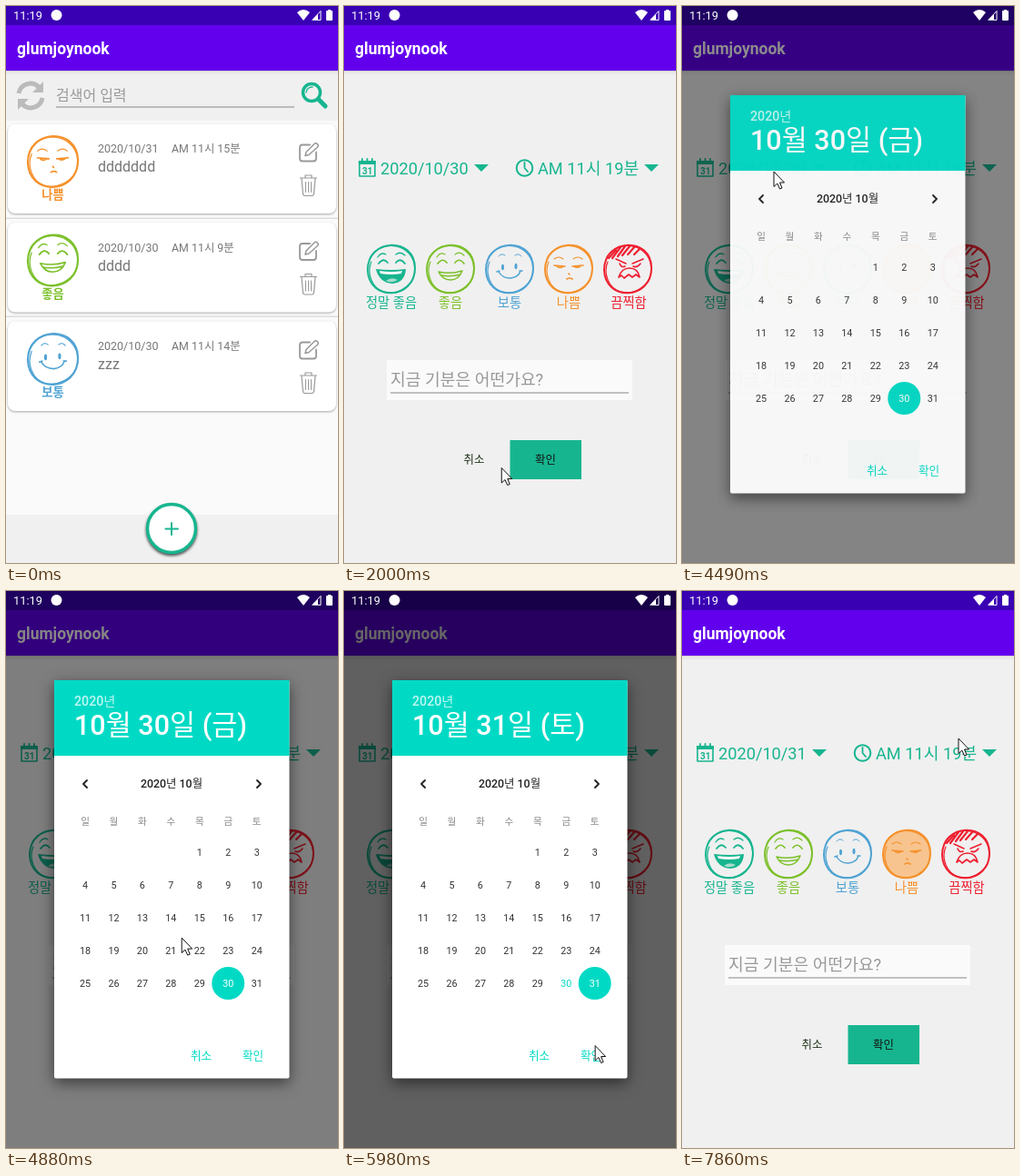
These frames come from a looping animation (365 px wide and 612 px high, 8 s). An HTML page:

```html
<!DOCTYPE html>
<html lang="ko">
<head>
<meta charset="utf-8">
<style>
html, body { margin: 0; width: 100%; height: 100%; overflow: hidden; background: #fafafa; }
svg { display: block; width: 365px; height: 612px; font-family: Roboto, "Noto Sans CJK KR", "Noto Sans CJK JP", sans-serif; }
.line { fill: none; stroke-linecap: round; stroke-linejoin: round; }
.card { filter: drop-shadow(0 1px 1px #0005); }
.dialog { filter: drop-shadow(0 5px 8px #0008); }
</style>
</head>
<body>
<svg id="stage" viewBox="0 0 365 612"></svg>
<script>
const LOOP = 8000;
const TEAL = '#17b58f', ACCENT = '#00dac5';

const text = (x, y, size, fill, str, extra = '') =>
  `<text x="${x}" y="${y}" font-size="${size}" fill="${fill}" ${extra}>${str}</text>`;
const mid = (x, y, size, fill, str, extra = '') =>
  text(x, y, size, fill, str, `text-anchor="middle" ${extra}`);
const rect = (x, y, w, h, fill, extra = '') =>
  `<rect x="${x}" y="${y}" width="${w}" height="${h}" fill="${fill}" ${extra}/>`;
const line = (d, color, width, extra = '') =>
  `<path class="line" d="${d}" stroke="${color}" stroke-width="${width}" ${extra}/>`;
const shape = (d, fill) => `<path d="${d}" fill="${fill}"/>`;
const at = (x, y, body, scale = 1) =>
  `<g transform="translate(${x} ${y}) scale(${scale})">${body}</g>`;

// Faces, drawn around their own centre
const brows = 'M-15-13Q-11-19-6-16M5-16Q10-20 15-15';
const smileEyes = 'M-14-6Q-9-13-4-7M5-7Q10-13 15-6';
const moods = {
  great: { color: TEAL, label: '정말 좋음', draw: c =>
    line(brows, c, 1.3) + line(smileEyes, c, 1.8) +
    shape('M-17 0Q0 2 16 0Q15 15 1 16Q-13 15-17 0Z', c) +
    shape('M-13 2Q0 4 12 2L11 5Q0 7-12 5Z', '#f8f8f8') +
    shape('M-6 13Q0 8 7 12Q1 16-6 13Z', '#a9dccd') },
  good: { color: '#7cc02b', label: '좋음', draw: c =>
    line(brows, c, 1.2) + line(smileEyes, c, 1.7) +
    line('M-13 3Q0 6 13 2Q9 12 0 12Q-9 12-13 3ZM-10 7Q0 9 11 6', c, 1.5) },
  normal: { color: '#4fa3d3', label: '보통', draw: c =>
    line('M-12-14Q-9-18-5-15M6-15Q10-18 13-14', c, 1) +
    `<g fill="${c}"><ellipse cx="-7.500" cy="-2" rx="1.500" ry="3.200"/><ellipse cx="7" cy="-3" rx="1.500" ry="3.200"/></g>` +
    line('M-12 3Q-8 10 1 10Q10 9 12 2M-14 3L-11 2M11 2L14 2', c, 1.5) },
  bad: { color: '#f5912c', label: '나쁨', draw: c =>
    line('M-16-11Q-11-15-6-11M5-11Q10-15 15-11', c, 1.1) +
    line('M-16-4L-4-3M4-3L16-4M-13-3Q-10 0-6-3M6-3Q10 0 14-4M-2 11Q1 9 4 11M0 5L1 6', c, 1.6) },
  awful: { color: '#ee2030', label: '끔찍함', draw: c =>
    line('M-21-12L-13-21M-17-12L-8-24M-11-14L-3-25M-6-15L2-25M0-16L8-25M7-16L13-22', c, 2.2) +
    line('M-13-11L-2-6M17-11L5-6M-9-6Q-7-1-3-3M14-6Q10-1 6-3', c, 1.6) +
    line('M-10 9Q-7-1 2-1Q11-1 13 9L9 6L5 9L1 6L-4 10L-7 7Z', c, 1.7) }
};
const face = ({ color, draw }) =>
  line('M-26 1C-26-34 26-36 26-1C26 34-25 36-26 1Z', color, 2) +
  line('M-23-13C-13-31 18-30 25-7C30 16 9 29-8 25C-22 21-27 4-22-8', color, 1.2) + draw(color);

const caret = (x, y) => shape(`M${x} ${y}h16l-8 8Z`, TEAL);

// Shared top of every screen
const toolbar = rect(0, 71, 365, 1, '#0002') + rect(0, 72, 365, 3, '#00000009') +
  rect(0, 0, 365, 21, '#3900b3') + rect(0, 21, 365, 50, '#6200ee') +
  text(12, 53, 17.5, '#fff', 'glumjoynook', 'font-weight="600"');

const statusIcons = text(8, 15, 12.8, '#fff', '11:19') +
  '<circle cx="55.500" cy="10" r="6" fill="#fff"/>' +
  shape('M320 7Q327 1 334 7L327 16Z', '#fff') +
  line('M337 15L346 5.500V15Z', '#fff', 1) + shape('M337 15L343 9V15Z', '#fff') +
  rect(352, 5, 7, 11, '#fff', 'rx="1"') + rect(354, 4, 3, 2, '#fff');

const pencil = line('M12 3H4Q1 3 1 6V18Q1 21 4 21H16Q19 21 19 18V11', '#999', 1.8) +
  line('M7 15L8 11L17 2Q19 0 21 3Q22 4 20 6L11 14Z', '#999', 1.5);
const trash = line('M1 4.500H19M6.500 4V1.500H13.500V4M2.500 5L4 22Q4.500 24 6 24H14Q15.500 24 16 22L17.500 5', '#999', 1.2) +
  line('M7 9V20M10 9V20M13 9V20', '#999', 1);

function card(y, mood, date, time, note) {
  return rect(2, y, 361, 98.5, '#fff', 'rx="8" class="card"') +
    at(51.5, y + 41.5, face(mood), 1.06) +
    mid(51.5, y + 82.5, 13.3, mood.color, mood.label, 'font-weight="700"') +
    text(101, y + 31.5, 12.5, '#777', date) + text(182, y + 31.5, 12.4, '#777', time) +
    text(101, y + 52.5, 16, '#777', note) +
    at(322, y + 20, pencil) + at(322.5, y + 55, trash);
}

const list = rect(0, 0, 365, 612, '#fafafa') + rect(0, 71, 365, 55, '#f0f0f0') +
  line('M14 96A13 13 0 0 1 36 89M40 101A13 13 0 0 1 18 108', '#bbb', 5, 'style="stroke-linecap:butt"') +
  shape('M41 83V95H29ZM13 114V102H25Z', '#bbb') +
  text(55, 104, 16, '#999', '검색어 입력') + rect(55, 110.5, 262, 1, '#888') +
  `<circle cx="336" cy="95" r="9.500" fill="none" stroke="${TEAL}" stroke-width="3.500"/>` +
  line('M344 103L351 110', TEAL, 5) + line('M330 95Q331 89 337 89', TEAL, 1.3) +
  rect(0, 232.5, 365, 1.5, '#ddd') + rect(0, 340.5, 365, 1.5, '#ddd') +
  card(129.5, moods.bad, '2020/10/31', 'AM 11시 15분', 'ddddddd') +
  card(238, moods.good, '2020/10/30', 'AM 11시 9분', 'dddd') +
  card(346.5, moods.normal, '2020/10/30', 'AM 11시 14분', 'zzz') +
  rect(0, 559, 365, 53, '#f0f0f0') +
  `<circle cx="182" cy="574" r="26.500" fill="#fff" stroke="${TEAL}" stroke-width="3.500" style="filter:drop-shadow(0 2px 1.5px #000a)"/>` +
  line('M175.500 574.500H189M182 568V581', TEAL, 2) + toolbar;

const editor = rect(0, 0, 365, 612, '#f0f0f0') +
  line('M17 171H34V187H17Z', TEAL, 1.6) + rect(16, 170, 19, 4, TEAL) +
  line('M20 168V171M25.500 168V171M31 168V171', TEAL, 1.8) +
  mid(25.7, 185, 10, TEAL, '31', 'font-weight="700"') +
  text(40, 185, 18.2, TEAL, '', 'id="date"') + caret(143, 174) +
  `<circle cx="198.500" cy="178" r="8.800" fill="none" stroke="${TEAL}" stroke-width="2"/>` +
  line('M198.500 172V178L202 182', TEAL, 1.8) +
  text(213, 185, 18.2, TEAL, 'AM 11시 19분') + caret(330, 174) +
  '<ellipse id="tint" cx="247" cy="289" rx="26" ry="26" fill="#f7c48f"/>' +
  ['great', 'good', 'normal', 'bad', 'awful'].map((name, i) => {
    const x = 52 + 65 * i, mood = moods[name];
    return at(x, 289, face(mood)) + mid(x + (i === 4 ? 1 : 0), 330.5, 14.3, mood.color, mood.label);
  }).join('') +
  rect(47, 389, 270, 44, '#fafafa') + text(51, 416.5, 18.2, '#999', '지금 기분은 어떤가요?') +
  rect(51, 424.5, 262, 1, '#888') +
  mid(143, 502.5, 12.4, '#1c3014', '취소') + rect(182.5, 477, 78.5, 43, TEAL) +
  mid(221.5, 502.5, 12.4, '#111', '확인') + toolbar;

const dayX = col => 87 + 31.45 * col;
const days = Array.from({ length: 31 }, (_, i) => {
  const cell = i + 4;
  return mid(dayX(cell % 7), 291 + 35.9 * Math.floor(cell / 7), 10.8, '#333', i + 1, `id="day${i + 1}"`);
}).join('');

const dialog = rect(53, 98, 258.5, 437.5, '#fff', 'rx="2" class="dialog"') +
  rect(53, 98, 258.5, 83, ACCENT) +
  text(75, 126, 14.2, '#ffffffc0', '2020년', 'font-weight="500"') +
  text(75, 158, 30.5, '#fff', '', 'id="heading" font-weight="500"') +
  line('M89 208L85 212L89 216M276 208L280 212L276 216', '#222', 1.8) +
  mid(182, 216, 12.4, '#222', '2020년 10월', 'font-weight="500"') +
  [...'일월화수목금토'].map((d, i) => mid(dayX(i), 257, 10.6, '#888', d)).join('') +
  `<circle id="selected" cy="431" r="18" fill="${ACCENT}"/>` + days +
  mid(214.5, 514.5, 12.6, ACCENT, '취소', 'font-weight="500"') +
  mid(271.5, 514.5, 12.6, ACCENT, '확인', 'font-weight="500"') +
  rect(53, 98, 258.5, 437.5, '#000', 'id="shade" rx="2"');

document.getElementById('stage').innerHTML = list +
  `<g id="editor">${editor}</g>` + rect(0, 0, 365, 612, '#000', 'id="dim"') + statusIcons +
  `<g id="dialog">${dialog}</g>` +
  `<g id="pointer"><circle id="press" r="12.500" fill="#ffee00"/>
   <path d="M0 0V16.500L3.800 13L6.500 19L9 18L6.500 12H11.500Z" fill="#fff" stroke="#111" stroke-width="1"/></g>`;

const $ = id => document.getElementById(id);
const set = (id, name, value) => $(id).setAttribute(name, value);
const ramp = (t, from, to) => {
  const p = Math.min(1, Math.max(0, (t - from) / (to - from)));
  return p * p * (3 - 2 * p);
};

// Pointer keys: time, x, y
const pointerKeys = [
  [210, 248, 596], [530, 180, 575], [1925, 180, 575], [2000, 173, 508],
  [2390, 265, 309], [2775, 265, 309], [2930, 274, 302], [3320, 65, 192],
  [3560, 101, 182], [4650, 101, 182], [4880, 193, 381], [5200, 263, 425],
  [5350, 263, 425], [5500, 274, 484], [5570, 274, 491], [5690, 274, 491],
  [6100, 277, 503], [6540, 266, 510], [6610, 265, 514], [7020, 265, 514],
  [7240, 272, 510], [7330, 272, 510], [7620, 281, 202], [7740, 281, 202],
  [7860, 304, 162], [LOOP, 304, 162]
];
const presses = [[760, 840], [2560, 2700], [3640, 3800], [5270, 5410], [6930, 7005]];

function pointerAt(t) {
  const i = Math.max(1, pointerKeys.findIndex(k => k[0] > t));
  const [t0, x0, y0] = pointerKeys[i - 1], [t1, x1, y1] = pointerKeys[i];
  const p = Math.max(0, (t - t0) / (t1 - t0));
  return [x0 + (x1 - x0) * p, y0 + (y1 - y0) * p];
}

function render(t) {
  const open = ramp(t, 4100, 4560) * (1 - ramp(t, 7020, 7240));
  const darker = ramp(t, 5000, 5300);
  const changed = t >= 5740;

  set('editor', 'opacity', ramp(t, 1220, 1600));
  set('tint', 'opacity', t >= 2630 ? 1 : 0);
  $('date').textContent = t >= 7020 ? '2020/10/31' : '2020/10/30';

  set('dim', 'opacity', open * (0.48 + 0.12 * darker));
  set('dialog', 'opacity', open);
  set('shade', 'opacity', 0.16 * darker * (1 - ramp(t, 5740, 5900)));
  $('heading').textContent = changed ? '10월 31일 (토)' : '10월 30일 (금)';
  set('selected', 'cx', dayX(changed ? 6 : 5));
  set('day30', 'fill', changed ? ACCENT : '#fff');
  set('day31', 'fill', changed ? '#fff' : '#333');

  set('pointer', 'transform', `translate(${pointerAt(t)})`);
  set('pointer', 'opacity', t >= 210 ? 1 : 0);
  set('press', 'opacity', presses.some(([a, b]) => t >= a && t < b) ? 0.5 : 0);
}

const start = performance.now();
function tick() {
  render((performance.now() - start) % LOOP);
  requestAnimationFrame(tick);
}
tick();
</script>
</body>
</html>
```
